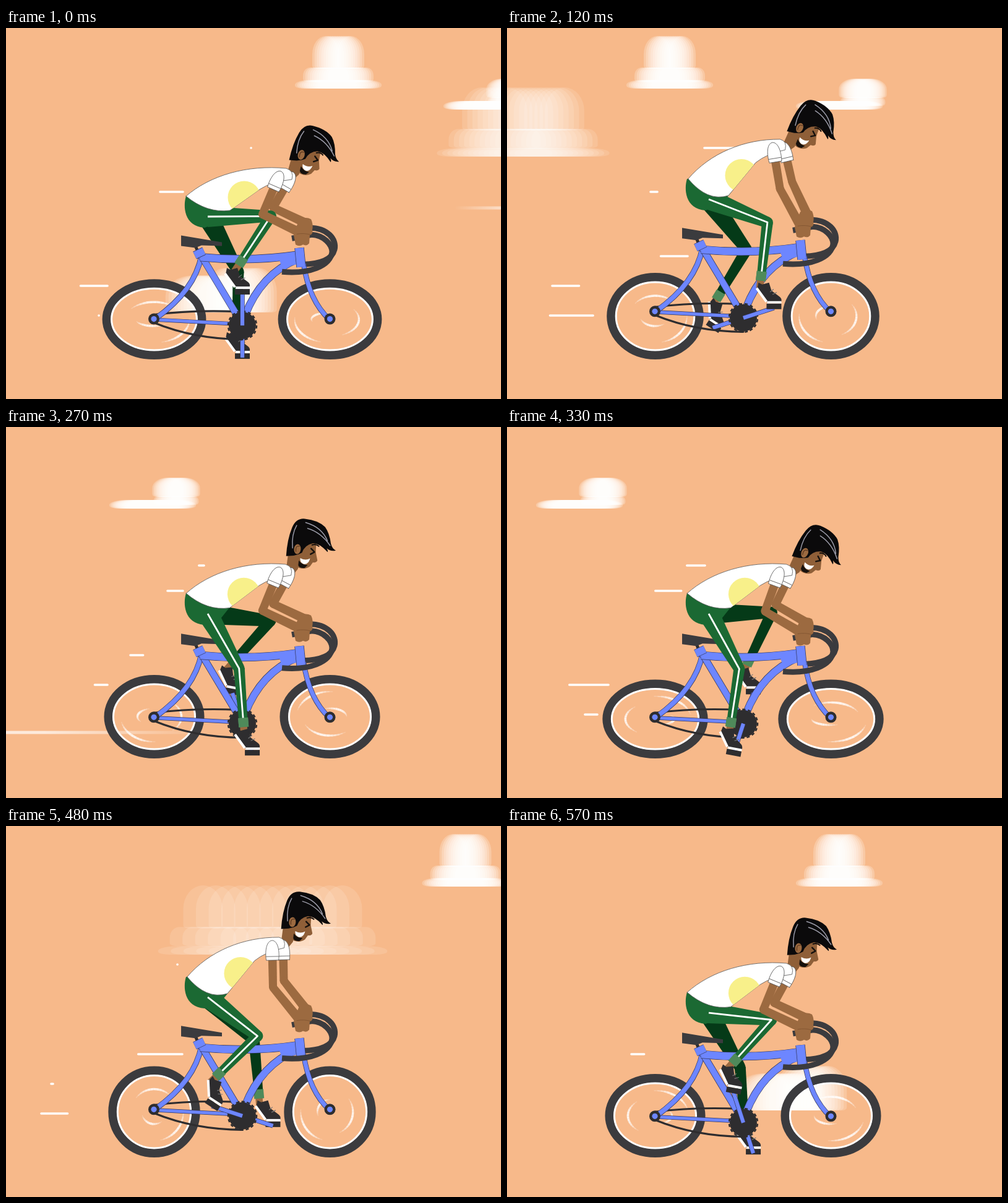
Recreate the animation shown at these times as an HTML page with a canvas. Size 800 px wide and 600 px high, loop 0.6 s.

```html
<!DOCTYPE html>
<html lang="en">
<head>
<meta charset="utf-8">
<title>Cyclist</title>
<style>
html, body { margin: 0; width: 100%; height: 100%; overflow: hidden; background: #f7b98a; }
canvas { display: block; }
</style>
</head>
<body>
<canvas id="stage" width="800" height="600"></canvas>
<script>
const ctx = document.getElementById('stage').getContext('2d');
const TAU = Math.PI * 2, DEG = TAU / 360, STEP = 30, STEPS = 20;
const BLUE = '#6d86ff', DARK = '#3b3b3e', INK = '#2e2d2f', SKIN = '#9c6a40', FACE = '#8f5f38';
const GREEN = '#1b6933', SHADE = '#053a18', CUFF = '#4f8a5a', WHITE = '#fff';

const clamp = v => Math.max(0, Math.min(1, v));
const smooth = v => v * v * (3 - 2 * v);
// The body bounces twice per loop
const bounce = (n, lag = 0) => Math.cos(2 * TAU * (n - lag) / STEPS);
const heading = (a, b) => Math.atan2(b[1] - a[1], b[0] - a[0]);

function fill(d, color) {
  ctx.fillStyle = color;
  ctx.fill(new Path2D(d));
}
function line(d, w, color, cap = 'round') {
  ctx.lineWidth = w;
  ctx.lineCap = cap;
  ctx.lineJoin = 'round';
  ctx.strokeStyle = color;
  ctx.stroke(new Path2D(d));
}
function tube(d, w) {
  line(d, w + 1.4, '#34365a', 'butt');
  line(d, w, BLUE, 'butt');
}
function cloth(d) {
  fill(d, WHITE);
  line(d, 0.8, '#555');
}
function disc(x, y, r, color) {
  ctx.fillStyle = color;
  ctx.beginPath();
  ctx.arc(x, y, r, 0, TAU);
  ctx.fill();
}
function at(x, y, angle, draw) {
  ctx.save();
  ctx.translate(x, y);
  ctx.rotate(angle);
  draw();
  ctx.restore();
}
function taper(a, ra, b, rb, color) {
  const len = Math.hypot(b[0] - a[0], b[1] - a[1]);
  at(...a, heading(a, b), () => fill(`M0 ${-ra}L${len} ${-rb}V${rb}L0 ${ra}Z`, color));
}
// Middle joint of a two-part limb; side picks the way it bends
function joint(a, b, u, v, side) {
  const d = Math.min(Math.hypot(b[0] - a[0], b[1] - a[1]), u + v - 0.5);
  const q = heading(a, b) + side * Math.acos((u * u + d * d - v * v) / (2 * u * d));
  return [a[0] + u * Math.cos(q), a[1] + u * Math.sin(q)];
}

function puff(x, y, w, h, round = 0.5) {
  const top = { x: w * round, y: h * 0.55 }, low = { x: w * 0.12, y: 5 };
  ctx.beginPath();
  ctx.roundRect(x, y, w, h, [top, top, low, low]);
  ctx.fill();
}
// A puff on two wider tiers
function stack(x, w, top, bottom, lean = 0) {
  const h = bottom - top, tier = w * 0.74 - Math.abs(lean), p = w * 0.44;
  puff(x + lean - p / 2, top, p, h * 0.62);
  puff(x + lean - tier / 2, top + h * 0.6, tier, h * 0.28, 0.15);
  puff(x - w / 2, bottom - 14, w, 14, 0.25);
}
function blur(x, spread, alpha, draw) {
  const copies = 12;
  ctx.fillStyle = `rgba(255,255,255,${alpha})`;
  for (let i = 0; i < copies; i++) draw(x + spread * (2 * i / (copies - 1) - 1));
}
function sky(n) {
  const rush = n < 10 ? 0 : clamp((17 - n) / 3);
  blur(815 - 192 * (n % 14), 46 + 200 * rush, 0.12, x => stack(x, 145, 96, 208));
  blur(537 - 68.5 * (n < 12 ? n : n - 19), 20, 0.22, x => stack(x, 100, 13, 98));
  blur(777 - 60 * n, 14, 0.24, x => stack(x, 112, 82, 132, 38));
  blur(683 - 111.4 * ((n + 3) % STEPS), 27, 0.18, x => {
    puff(x - 64, 400, 90, 60);
    puff(x + 2, 388, 60, 72);
  });
}

// Speed lines: [y, x, length, first step, runs]
const lanes = [
  [465, 148, 93, 0, 2], [417, 166, 95, -2, 2], [265, 288, 58, -3, 2],
  [369, 294, 95, 2, 2], [194, 394, 89, 0, 1], [224, 322, 47, 8, 1]
];
function streak(age, y, x, len) {
  if (age < 0 || age > 8) return;
  const head = x - len * Math.sin(clamp(age / 6) * TAU / 4);
  const tail = x - len * smooth(clamp((age - 3) / 6));
  line(`M${head + 2} ${y}H${Math.max(head + 2.1, tail - 2)}`, 3.6, WHITE);
}
function ray(y, left, right) {
  const g = ctx.createLinearGradient(left, 0, right, 0);
  g.addColorStop(0, 'rgba(255,255,255,0)');
  g.addColorStop(0.15, 'rgba(255,255,255,.7)');
  g.addColorStop(0.7, 'rgba(255,255,255,.7)');
  g.addColorStop(1, 'rgba(255,255,255,0)');
  ctx.fillStyle = g;
  ctx.fillRect(left, y - 2.5, right - left, 5);
}
function rush(n) {
  ray(291, 725 - 400 * n, 1400 - 385 * n);
  if (n > 5) ray(494, 215 - 390 * (n - 7), 1100 - 385 * (n - 7));
  for (const [y, x, len, first, runs] of lanes)
    for (let i = 0; i < runs; i++) streak(n - first - 10 * i, y, x, len);
}

function wheel(x, n, spin) {
  const top = 398.5 + 10 * bounce(n, 1.1);
  const ry = (536 - top) / 2, rx = 75 + (top - 390) * 0.55, y = top + ry;
  const ring = (inset, w, color, from = 0, to = TAU) => {
    ctx.lineCap = 'butt';
    ctx.lineWidth = w;
    ctx.strokeStyle = color;
    ctx.beginPath();
    ctx.ellipse(x, y, rx - inset, ry - inset, 0, from, to);
    ctx.stroke();
  };
  ring(7, 14, DARK);
  ring(15, 3, WHITE);
  const glint = (inset, mid, half) => {
    const parts = 14, d = 2 * half / parts;
    for (let i = 0; i < parts; i++) {
      const p = Math.sin(Math.PI * (i + 0.5) / parts), a = (spin + mid - half + i * d) * DEG;
      ring(inset, 1 + 2.6 * p, `rgba(255,255,255,${0.15 + 0.7 * p})`, a, a + d * DEG);
    }
  };
  glint(27, 145, 40);
  glint(37, 15, 50);
  glint(54, 215, 55);
}

function frame(n) {
  line('M239 464Q300 456 376 459M239 477Q305 504 382 504', 3.2, INK);
  tube('M240 472L372 479', 5);
  tube('M242 470Q305 425 316 368', 7.5);
  tube('M314 366L374 466', 10);
  tube('M386 466Q412 398 472 374', 11);
  tube('M314 371Q395 379 474 367', 12);
  fill('M440 370L474 361L478 381L446 388Z', BLUE);
  tube('M481 382Q490 442 523 472', 7);
  line('M305 350L310 362', 5, INK);
  tube('M305 368L320 361', 12);
  fill('M283 336L349 347V353L316 352L306 356L283 353Z', DARK);
  tube('M474 356L477 387', 14);
  for (const x of [239, 523.5]) {
    disc(x, 471, 9, INK);
    disc(x, 471, 4.6, BLUE);
  }
  at(382, 481.5, TAU * n / STEPS, () => {
    disc(0, 0, 22, INK);
    ctx.setLineDash([5, 4]);
    line('M23 0A23 23 0 1 1 -23 0A23 23 0 1 1 23 0', 2.5, INK, 'butt');
    ctx.setLineDash([]);
  });
}

function legPose(n, hip, axle) {
  const a = TAU * n / STEPS, s = Math.sin(a);
  const pedal = [axle[0] + 52 * s, axle[1] - 52 * Math.cos(a)];
  const ankle = [pedal[0] - 5.5 - 17.5 * Math.sin(a - 0.22), pedal[1] - 52];
  return { hip, ankle, pedal, knee: joint(hip, ankle, 102, 87, -1), tilt: Math.max(0, -s) * 35 * DEG };
}
function foot({ knee, ankle, pedal, tilt }) {
  at(...ankle, heading(knee, ankle), () => fill('M0 -6L20 -5V6L0 6Z', SKIN));
  at(...pedal, tilt, () => {
    ctx.translate(0, -4);
    fill('M-25 -37L-19 -34L-8 -37L-4 -24L8 -15Q13 -12 12 -6L-11 -5L-27 -27Z', INK);
    line('M-28 -28L-12 -6', 4, WHITE, 'butt');
    line('M-11 -5H12', 4, WHITE, 'butt');
    line('M-6 -22L-1 -26M-2 -18L4 -21', 1.2, '#777');
    fill('M-12 -3H12V6H-12Z', INK);
  });
}
function leg({ hip, knee, ankle }, color) {
  taper(hip, 17, knee, 9, color);
  disc(...knee, 9, color);
  taper(knee, 9, ankle, 7, color);
  at(...ankle, heading(knee, ankle), () => fill('M-7 -8H8V8H-7Z', CUFF));
}

function arm({ shoulder, elbow, hand }) {
  taper(shoulder, 7, elbow, 6.5, SKIN);
  disc(...elbow, 6.5, SKIN);
  taper(elbow, 6.5, hand, 7.5, SKIN);
}
function sleeve({ shoulder, elbow }) {
  at(...shoulder, heading(shoulder, elbow), () => {
    cloth('M23 -10V10C10 12 -8 10 -9 0C-8 -10 10 -12 23 -10Z');
    line('M17 -10V10', 0.8, '#555');
  });
}

// The head is laid out upright and turns about the base of the neck
function headAt(x, y, angle, draw) {
  at(x, y, angle, () => {
    ctx.translate(-449, -205.5);
    draw();
  });
}
function neck() {
  fill('M447 172L466 186L465 198L457 210L446 206Z', FACE);
}
function head() {
  fill('M450 158L490 146L491 168L495 181Q494 185 488 185L484 192Q477 198 467 196L449 190Z', FACE);
  fill('M465 184Q471 191 480 190L476 195Q468 197 465 192Z', '#17110d');
  fill('M467 180Q476 184 483 179Q481 190 473 189Q467 187 467 180Z', WHITE);
  fill('M444 179Q443 152 449 132Q454 116 468 116Q490 116 502 126Q510 135 514 152Q517 160 523 162' +
    'Q515 165 508 160Q511 164 510 166Q496 153 485 154Q472 158 469 171L464 174L456 177Z', '#0b0a0b');
  at(461, 166, 0, () => fill('M-5.5 0A5.5 8 0 1 1 5.5 0A5.5 8 0 1 1 -5.5 0', SKIN));
  line('M459 170Q457 160 464 161', 1.2, '#5b3820');
  line('M453 165Q449 143 456 128M470 122Q497 127 508 148M474 131Q496 135 513 155', 1.5, '#9b9ba8');
  line('M483 163L489 168L483 172', 2.4, '#15100d');
  line('M484 157Q490 154 495 158', 2, '#15100d');
}

function render(n) {
  const c = bounce(n), k = (1 - c) / 2;
  const lift = 6.8 * c - 7.2, waist = 256.5 + 15.5 * c;
  const grip = 329.5 + 10 * bounce(n, 0.8), steer = grip - 338;
  const axle = [382, 481.5 + lift], hip = [326, waist + 33];
  const near = legPose(n, hip, axle), far = legPose(n + STEPS / 2, hip, axle);
  const pivot = [451 + 5 * c, 214.5 + 26 * c, (14 + 14 * Math.sin(2 * TAU * n / STEPS)) * DEG];

  // Raises the torso: more towards the shoulders, less along the hem
  const lean = (x, y) => {
    const u = (x - 291) / 162;
    return [x + k * (2 - 15 * u), y - k * (36 + 16 * u - Math.max(0, y - 262) / 2)];
  };
  const armPose = (shoulder, hand, u, v) => ({ shoulder, hand, elbow: joint(shoulder, hand, u, v, 1) });
  const nearArm = armPose(lean(441, 240), [472, grip - 9], 67, 64);
  const farArm = armPose(lean(460, 241), [486, grip - 22], 57, 60);
  const shirt = `M${lean(291, 272)}C${lean(330, 238)} ${lean(390, 221)} ${lean(453, 227)}` +
    `Q${lean(466, 231)} ${lean(462, 245)}Q${lean(430, 248)} ${lean(410, 261)}` +
    `L${lean(362, 295)}Q${lean(325, 300)} ${lean(291, 272)}Z`;

  ctx.fillStyle = '#f7b98a';
  ctx.fillRect(0, 0, 800, 600);
  sky(n);
  rush(n);

  wheel(239.5, n, 90 * n - 107);
  wheel(523.5, n, 90 * n);
  foot(far);
  leg(far, SHADE);
  tube(`M${axle}L${far.pedal}`, 6);
  at(0, steer, 0, () => line('M488 323C520 322 535 342 531 358C527 374 510 381 480 382', 9, DARK, 'butt'));
  at(0, lift, 0, () => frame(n));
  at(0, steer, 0, () => line('M462 340L494 334C514 335 527 350 527 362C524 385 490 398 446 394', 9, DARK, 'butt'));
  tube(`M${axle}L${near.pedal}`, 6);
  arm(farArm);

  foot(near);
  leg(near, GREEN);
  at(0, waist, 0, () => fill('M291 0C286 15 287 49 321 51L346 42L362 22L330 0Z', GREEN));
  line(`M${hip}L${near.knee}L${near.ankle}`, 2.8, WHITE, 'butt');
  at(...near.ankle, heading(near.knee, near.ankle), () => fill('M-7 -8H8V8H-7Z', CUFF));

  headAt(...pivot, neck);
  sleeve(farArm);
  cloth(shirt);
  ctx.save();
  ctx.clip(new Path2D(shirt));
  disc(...lean(385, 274), 26.5, '#f8f08a');
  ctx.restore();

  arm(nearArm);
  sleeve(nearArm);
  at(0, steer, 0, () => {
    fill('M468 324L474 310Q484 304 493 309Q497 317 495 327Q497 332 491 335L490 348Q486 353 480 350' +
      'Q474 354 468 350L465 335Z', SKIN);
    line('M470 333Q482 331 492 334', 0.8, '#7f5430');
  });
  headAt(...pivot, head);
}

const start = performance.now();
function tick() {
  render(Math.floor((performance.now() - start) / STEP) % STEPS);
  requestAnimationFrame(tick);
}
tick();
</script>
</body>
</html>
```
